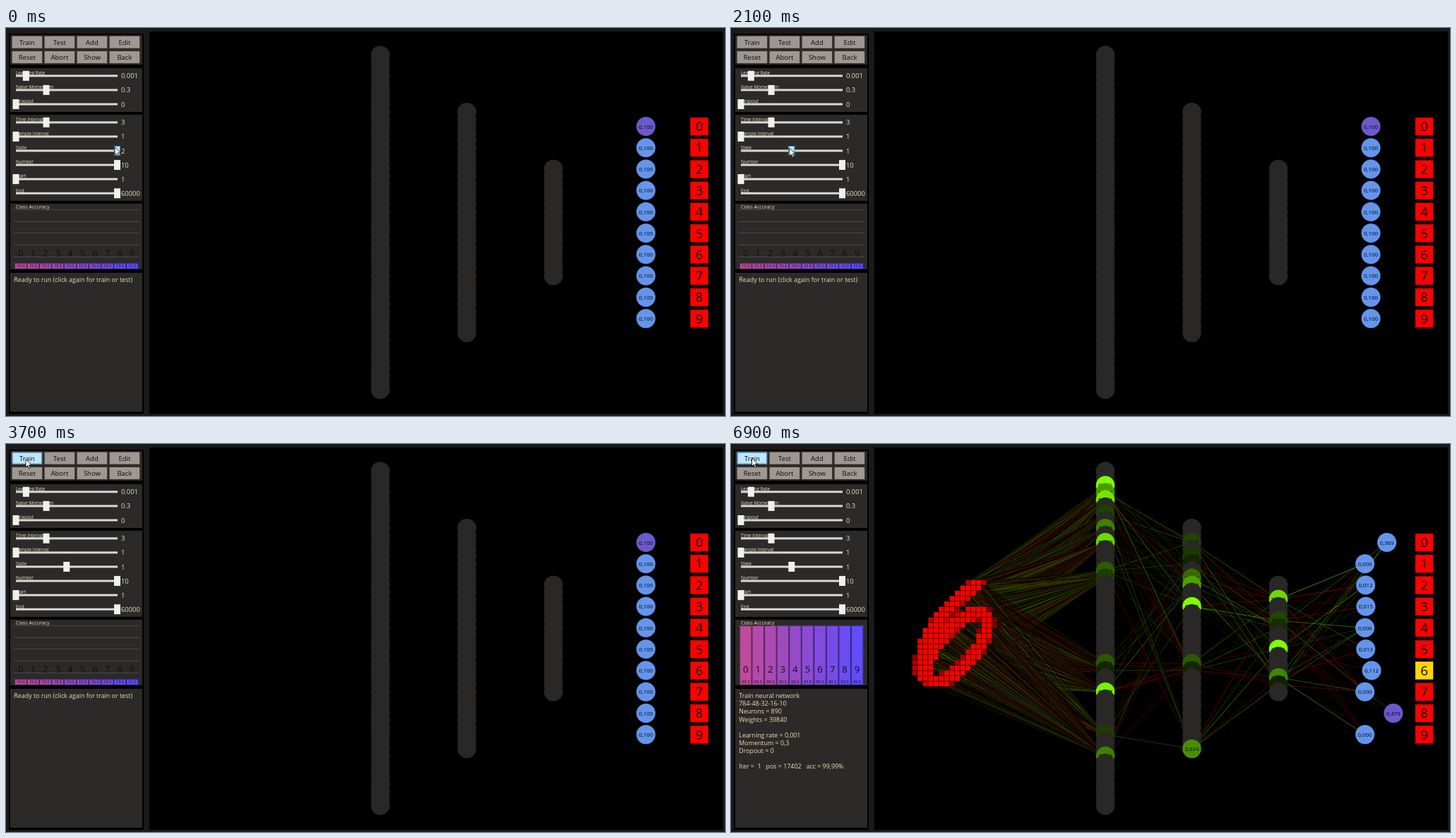
These frames come from a looping animation (1018 px wide and 550 px high, 8000 ms). An HTML page with a canvas:

```html
<!DOCTYPE html>
<html lang="en">
<head>
<meta charset="utf-8">
<title>Neural network trainer</title>
<style>
html, body { margin: 0; width: 100%; height: 100%; overflow: hidden; background: #1a1a1a; }
canvas { display: block; width: 1018px; height: 550px; }
</style>
</head>
<body>
<canvas id="stage" width="1018" height="550"></canvas>
<script>
const ctx = document.getElementById('stage').getContext('2d');
const LOOP = 8000;
const FIRST = 500;
const HOLD = 1600;
const CREAM = '#f0dfb0';
const MID = 275.6;
const GAP = 10.09;
const TAU = Math.PI * 2;

const SCENES = [
  { pointer: [154, 168.5], state: 2, hover: true },
  { pointer: [158.5, 172.5], state: 2, pressed: true },
  { pointer: [82.5, 170], state: 1, hover: true },
  { pointer: [28, 21.5], state: 1, ready: true },
  { pointer: [29.5, 20], state: 1, ready: true, running: true },
  { pointer: [29.5, 20], state: 1, ready: true, running: true, trained: true }
];

function rect(x, y, w, h, fill) {
  ctx.fillStyle = fill;
  ctx.fillRect(x, y, w, h);
}

function frame(x, y, w, h, color) {
  ctx.strokeStyle = color;
  ctx.lineWidth = 1;
  ctx.strokeRect(x + .5, y + .5, w - 1, h - 1);
}

function disc(x, y, r, fill) {
  ctx.fillStyle = fill;
  ctx.beginPath();
  ctx.arc(x, y, r, 0, TAU);
  ctx.fill();
}

function text(s, x, y, size, color = CREAM, align = 'left') {
  ctx.font = size + 'px "Open Sans", "Noto Sans", sans-serif';
  ctx.textAlign = align;
  ctx.fillStyle = color;
  ctx.fillText(s, x, y);
}

function makeRandom(seed) {
  return () => {
    seed = (seed * 1664525 + 1013904223) >>> 0;
    return seed / 4294967296;
  };
}

// ---- left side ----

function drawPanels() {
  rect(0, 0, 1018, 550, '#1a1a1a');
  rect(203, 5, 812, 542, '#000');
  rect(4, 8, 191, 539, '#000');
  for (const [top, bottom] of [[10, 52], [57, 119], [123, 245], [249, 342], [347, 544]])
    rect(6, top, 187, bottom - top, '#2c2a29');
}

function drawButtons(hot) {
  ['Train', 'Test', 'Add', 'Edit', 'Reset', 'Abort', 'Show', 'Back'].forEach((name, i) => {
    const x = 8.6 + 46 * (i % 4);
    const y = 11.6 + 21.3 * Math.floor(i / 4);
    const lit = hot && i === 0;
    rect(x, y, 42.6, 17, lit ? '#bee6fd' : '#9e9792');
    if (lit) frame(x, y, 42.6, 17, '#3c7fb1');
    text(name, x + 21.3, y + 12.1, 9.5, '#0c0c0c', 'center');
  });
}

function drawSliders(state, hover) {
  const rows = [
    ['Learning Rate', .1, '0.001'], ['Naive Momentum', .3, '0.3'], ['Dropout', 0, '0'],
    ['Time Interval', .3, '3'], ['Sample Interval', 0, '1'], ['State', state / 2, state],
    ['Number', 1, '10'], ['Start', 0, '1'], ['End', 1, '60000']
  ];
  rows.forEach(([label, part, value], i) => {
    const x = 14 + 143.5 * part;
    const y = 67.8 + 20.1 * i + (i > 2 ? 5.7 : 0);
    const lit = hover && label === 'State';
    text(label, 14, y - 1.8, 6.4);
    rect(14, y - 1.5, 144, 3, '#dad7d4');
    rect(x - 4.5, y - 7, 9, 14, lit ? '#bee6fd' : '#f0f0f0');
    if (lit) frame(x - 4.5, y - 7, 9, 14, '#3c7fb1');
    text(value, 163, y + 3.5, 9.4);
  });
}

function drawAccuracy(trained) {
  for (let i = 0; i < 5; i++) rect(11, 257 + Math.round(i * 16.7), 178, 1, '#4d4b49');
  for (let i = 0; i < 10; i++) {
    const k = i / 9;
    const x = 12 + 17.55 * i;
    const value = trained ? 99.5 : 10;
    const h = .85 * value;
    rect(x, 341.7 - h, 17.5, h, `rgb(${190 - 92 * k},${74 + 2 * k},${158 + 97 * k})`);
    frame(x, 341.7 - h, 17.5, h, 'rgba(0,0,0,.5)');
    text(value.toFixed(1), x + 8.7, 338.8, 5.8, '#111', 'center');
    text(i, x + 8.7, 323.6, 13.3, '#101010', 'center');
  }
  text('Class Accuracy', 14, 255.7, 7);
}

function drawLog(running, trained) {
  const lines = running ? [
    'Train neural network', '784-48-32-16-10', 'Neurons = 890', 'Weights = 39840', '',
    'Learning rate = 0,001', 'Momentum = 0,3', 'Dropout = 0'
  ] : ['Ready to run (click again for train or test)'];
  if (trained) lines.push('', 'Iter =  1   pos = 17402   acc = 99,99%');
  lines.forEach((s, i) => text(s, 11.3, 360.2 + 11.1 * i, 8.9));
}

// ---- network ----

// Peaks are [position, height]; each fades out within one neuron.
const LAYERS = [
  { x: 530, count: 48, peaks: [[2, 1], [3.6, 1.5], [6, .25], [8, .5], [10, .85], [14.4, .6],
    [27.3, .5], [31, .95], [37, .24], [40, .5]] },
  { x: 652.5, count: 32, peaks: [[2, .27], [4.4, .37], [7.6, 1.05], [11, 1], [19.3, .5], [31, .56]] },
  { x: 775, count: 16, peaks: [[2, .85], [5.4, .45], [9, 1], [13.2, .65]] }
].map(({ x, count, peaks }) => Array.from({ length: count }, (_, i) => ({
  x,
  y: MID + (i - (count - 1) / 2) * GAP,
  level: Math.max(0, ...peaks.map(([at, height]) => height * (1 - Math.abs(i - at))))
})));

const START = Array(10).fill(.1);
const RESULT = [.369, 0, .012, .015, 0, .013, .112, 0, .479, 0];

const outY = i => 139.5 + 30.26 * i;
const outX = p => 897.6 + 84 * p;
const comma = n => n.toFixed(3).replace('.', ',');

// A handwritten six: a curved stem and a tilted oval.
function penPoints() {
  const points = [];
  for (let t = 0; t <= 1; t += .01) {
    const s = 1 - t;
    points.push([
      s * s * 349 + 2 * s * t * 262 + t * t * 270,
      s * s * 198 + 2 * s * t * 260 + t * t * 328
    ]);
    const along = 60 * Math.cos(TAU * t);
    const across = 25 * Math.sin(TAU * t);
    points.push([320 + .643 * along + .766 * across, 288 - .766 * along + .643 * across]);
  }
  return points;
}

function digitPixels() {
  const pen = penPoints();
  const pixels = [];
  for (let row = 0; row < 20; row++)
    for (let col = 0; col < 16; col++) {
      const x = 260 + 7.56 * col;
      const y = 196.4 + 7.56 * row;
      const distance = Math.min(...pen.map(([px, py]) => Math.hypot(x - px, y - py)));
      const level = Math.min(1, (13 - distance) / 5);
      if (level > .45) pixels.push({ x, y, level });
    }
  return pixels;
}
const PIXELS = digitPixels();

function connect(from, to, rand, bright, power) {
  ctx.lineWidth = 1;
  for (const b of to)
    for (const a of from) {
      const green = rand() < (b.y < 300 ? .58 : .46);
      const c = bright * rand() ** power * (.5 + .5 * a.level);
      ctx.strokeStyle = green ? `rgba(${c / 2},${c},0,.8)` : `rgba(${c},0,0,.8)`;
      ctx.beginPath();
      ctx.moveTo(a.x, a.y);
      ctx.lineTo(b.x, b.y);
      ctx.stroke();
    }
}

function drawEdges() {
  const rand = makeRandom(784);
  const [first, second, third] = LAYERS.map(layer => layer.filter(n => n.level > 0));
  const outputs = RESULT.map((p, i) => ({ x: outX(p), y: outY(i) }));
  connect(PIXELS, first, rand, 110, 1.7);
  connect(first, second, rand, 150, 1.7);
  connect(second, third, rand, 180, 1.6);
  connect(third, outputs, rand, 210, 1.6);
}

function drawDigit() {
  for (const { x, y, level } of PIXELS)
    rect(x - 3.4, y - 3.4, 6.8, 6.8, `rgb(${Math.round(255 * level)},0,0)`);
}

function drawLayer(layer, trained) {
  for (const { x, y, level } of layer) {
    const lit = trained && level > 0;
    disc(x, y, 13.3, lit ? `rgb(${127 * level},${255 * level},0)` : '#292826');
    if (lit) text(comma(level * 6.471), x, y + 2.8, 7.9, '#0a0a0a', 'center');
  }
}

function drawOutputs(values, target) {
  const top = values.indexOf(Math.max(...values));
  values.forEach((p, i) => {
    const y = outY(i);
    disc(outX(p), y, 13.5, i === top ? '#6a5acd' : '#6495ed');
    text(comma(p), outX(p), y + 3, 7.9, '#080808', 'center');
    rect(968.9, y - 12.6, 25.3, 25.3, i === target ? '#ffd700' : '#f00');
    text(i, 981.5, y + 6.7, 18.8, '#0a0000', 'center');
  });
}

// ---- pointer ----

function drawPointer(x, y) {
  const shape = [[0, 0], [0, 11.5], [2.7, 9], [4.6, 13.3], [6.4, 12.5], [4.6, 8.3], [8.2, 8.3]];
  ctx.beginPath();
  for (const [dx, dy] of shape) ctx.lineTo(x + dx, y + dy);
  ctx.closePath();
  ctx.fillStyle = '#fff';
  ctx.fill();
  ctx.strokeStyle = '#000';
  ctx.lineWidth = .8;
  ctx.stroke();
}

function draw({ pointer, state, hover, pressed, ready, running, trained }) {
  drawPanels();
  drawButtons(ready);
  drawSliders(state, hover);
  drawAccuracy(trained);
  drawLog(running, trained);
  if (trained) {
    drawEdges();
    drawDigit();
  }
  for (const layer of LAYERS) drawLayer(layer, trained);
  drawOutputs(trained ? RESULT : START, trained ? 6 : -1);
  if (pressed) disc(158.3, 173, 10.2, 'rgba(222,214,20,.78)');
  drawPointer(...pointer);
}

let shown = -1;
function tick() {
  const time = performance.now() % LOOP;
  const step = Math.floor((time - FIRST) / HOLD) + 1;
  if (step !== shown) draw(SCENES[shown = step]);
  requestAnimationFrame(tick);
}
tick();
</script>
</body>
</html>
```
